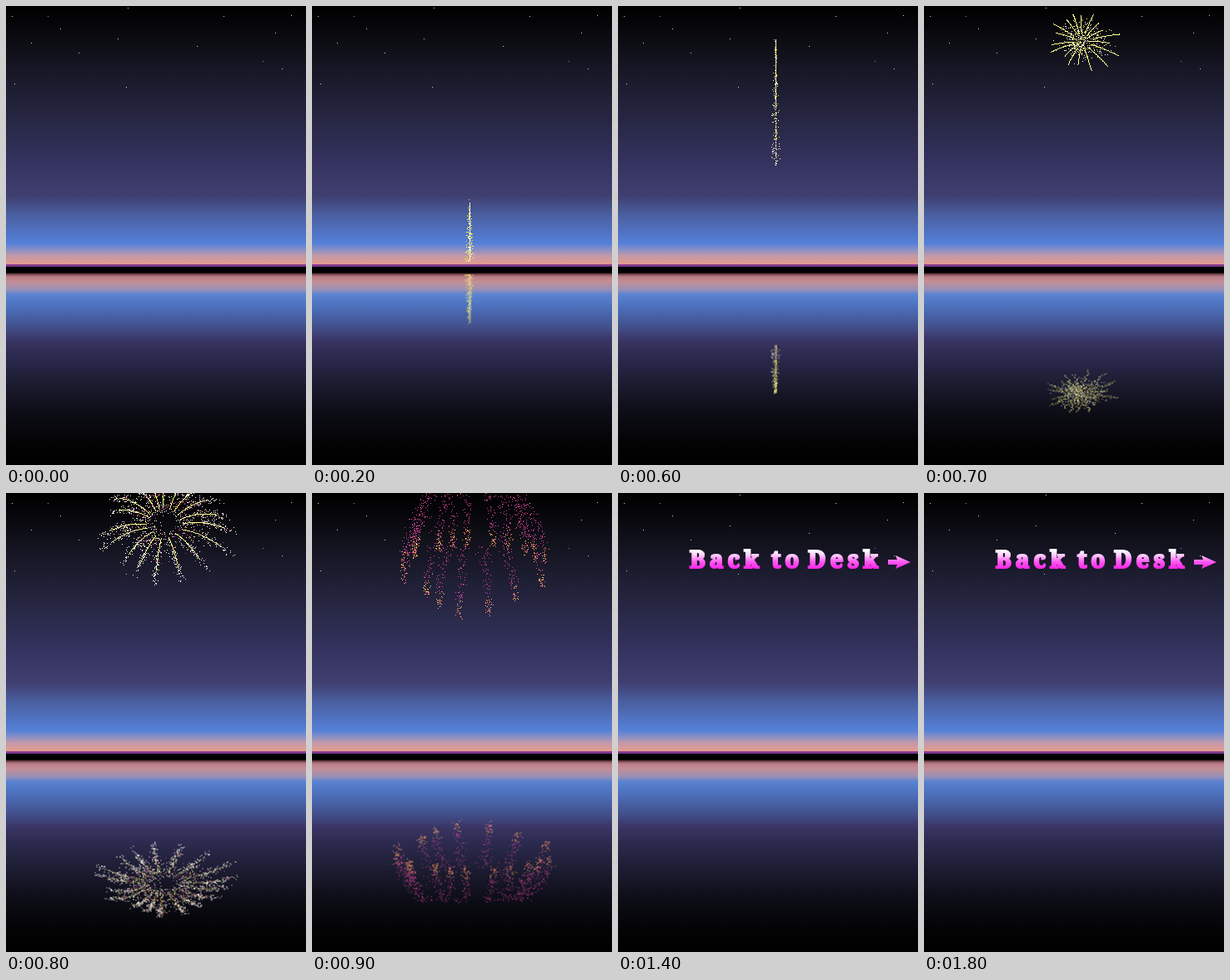
These frames come from a looping animation (360 by 551 pixels, 2.3 s). An HTML page with a canvas:

```html
<!DOCTYPE html>
<html lang="en">
<head>
<meta charset="utf-8">
<title>Fireworks over water</title>
<style>
  html, body { margin: 0; width: 100%; height: 100%; overflow: hidden; background: #000; }
  canvas, svg { position: absolute; left: 0; top: 0; width: 360px; height: 551px; }
  text { font: 900 28px "Noto Serif", serif; letter-spacing: 5px; }
</style>
</head>
<body>
<canvas id="stage" width="360" height="551"></canvas>
<svg viewBox="0 0 360 551">
  <defs>
    <linearGradient id="pink" gradientUnits="userSpaceOnUse" x1="0" y1="69" x2="0" y2="91">
      <stop offset="0" stop-color="#fff"/>
      <stop offset=".3" stop-color="#ffc0fa"/>
      <stop offset=".6" stop-color="#ff5cf2"/>
      <stop offset="1" stop-color="#f822e6"/>
    </linearGradient>
  </defs>
  <g id="sign" fill="url(#pink)" visibility="hidden">
    <text y="89.5" stroke="url(#pink)" stroke-width="2.2"><tspan x="86">Back</tspan><tspan x="184">to</tspan><tspan x="228">Desk</tspan></text>
    <path id="arrow" d="M324 80H335L333 75L351 83L333 91L335 86H324Z"/>
  </g>
</svg>
<script>
const LOOP = 2300, STEP = 100;
const ctx = document.getElementById('stage').getContext('2d');
const sign = document.getElementById('sign');
const arrow = document.getElementById('arrow');

const SKY = [
  [0, '#000'], [30, '#08080d'], [60, '#12121d'], [100, '#1d1d31'], [150, '#2a2a4a'],
  [190, '#353360'], [228, '#403f70'], [250, '#4a5e9f'], [285, '#5580d8'], [293, '#8a90c4'],
  [300, '#c499a8'], [310, '#e49b8f'], [310, '#94408f'], [313, '#6a3488'], [313, '#000'],
  [320, '#000'], [322, '#7a4650'], [325, '#b87d86'], [331, '#c48e96'], [340, '#9a90b4'],
  [347, '#5882d2'], [365, '#4a6bb4'], [385, '#42508c'], [402, '#393463'], [420, '#2c2a4f'],
  [450, '#1d1d33'], [480, '#10101c'], [505, '#08080e'], [530, '#030304'], [551, '#000']
];
const STARS = [
  [7, 12], [50, 12, 1], [65, 27], [30, 44], [87, 56], [134, 39], [146, 2], [229, 48],
  [261, 12], [323, 32], [342, 11], [308, 66, 1], [331, 75], [10, 93], [144, 97]
];
// Ray tips, measured from the burst centre at full bloom.
const RAYS = [
  [-11, 65], [21, 62], [49, 46], [79, 29], [83, 3], [72, -15], [61, -35], [43, -48], [26, -62],
  [-3, -68], [-19, -60], [-34, -50], [-60, -38], [-61, -21], [-74, 7], [-72, 23], [-48, 39], [-34, 56]
];
const CX = 189, CY = 43;
const YELLOW = '#ffff8c', GOLD = '#e8d838', WHITE = '#fff', PINK = '#d8489c', ORANGE = '#ff9c48';

const sky = ctx.createLinearGradient(0, 0, 0, 551);
SKY.forEach(([y, c]) => sky.addColorStop(y / 551, c));

let seed = 1;
const rnd = () => (seed = seed * 16807 % 2147483647) / 2147483647;
const spread = r => (rnd() + rnd() - 1) * r;
const pick = list => list[Math.floor(rnd() * list.length)];

function dot(x, y, color, size = 1, alpha = 1) {
  ctx.globalAlpha = alpha;
  ctx.fillStyle = color;
  ctx.fillRect(Math.round(x), Math.round(y), size, size);
  ctx.globalAlpha = 1;
}

function background() {
  ctx.fillStyle = sky;
  ctx.fillRect(0, 0, 360, 551);
  STARS.forEach(([x, y, teal]) => dot(x, y, teal ? '#2cb4b4' : '#d0d0d8'));
}

function rocket(step) {
  const head = 133 - (step - 4) * 49;
  const tail = Math.min(306, head + 157);
  const mirror = y => {
    const d = y - 133;
    return Math.max(322, 437 - 0.43 * d - 0.00148 * d * d);
  };
  const spark = (x, y, color) => {
    dot(x, y, color);
    dot(x - 1, mirror(y), color, 2, 0.2);
  };
  for (let y = head + 5; y < tail; y++) {
    const u = (y - head) / 157;
    if (u < 0.55 || rnd() < 0.75) dot(189, y, y % 9 ? '#f4f0dc' : YELLOW);
  }
  const top = mirror(tail), bottom = mirror(head);
  ctx.globalAlpha = 0.4;
  ctx.fillStyle = '#d8d088';
  ctx.fillRect(188, top, 3, bottom - top);
  ctx.globalAlpha = 1;
  for (let i = 0; i < 150; i++) {
    const u = Math.pow(rnd(), 0.7);
    const x = 188.5 + spread(2 + 5 * u);
    spark(x, head + u * (tail - head), pick([YELLOW, GOLD, GOLD, WHITE]));
  }
}

// Sparks go up to the sky picture and down, squashed and softer, to the water.
function sparkler(squash, widen, shift, glow) {
  return (x, y, color, alpha = glow) => {
    dot(x, y, color);
    const ry = CY + 420 - squash * (y - CY) + spread(1.5);
    const rx = CX + shift + (x - CX) * widen + Math.sin(ry * 0.9) * 1.5;
    dot(rx - 1, ry - 1, color, 2, alpha);
  };
}

function burst(reach, sag, open) {
  const spark = open ? sparkler(0.65, 1.04, -1, 0.24) : sparkler(0.74, 1, -3, 0.2);
  RAYS.forEach(([vx, vy]) => {
    const size = open ? reach : reach * (0.8 + 0.5 * rnd());
    const at = u => [CX + vx * size * u, CY + vy * size * u + sag * (u * u - u)];
    const scatter = (n, from, to, r, colors) => {
      for (let i = 0; i < n; i++) {
        const [x, y] = at(from + rnd() * (to - from));
        spark(x + spread(r), y + spread(r), pick(colors));
      }
    };
    const du = 0.9 / (Math.hypot(vx, vy) * size);
    for (let u = 0.28; u < (open ? 0.88 : 1); u += du) spark(...at(u), YELLOW, 0.13);
    if (open) {
      scatter(48, 0.58, 1.04, 6, [WHITE, WHITE, '#f0e8c8']);
      scatter(36, 0.22, 0.68, 13, [WHITE, WHITE, YELLOW, PINK]);
      scatter(5, 0.5, 0.95, 7, [PINK]);
    } else {
      scatter(20, 0.05, 0.75, 9, [YELLOW, WHITE, WHITE, GOLD]);
    }
  });
}

// The spent rays hang as columns; those thrown upward have lost their speed.
function embers() {
  const spark = sparkler(0.65, 1.08, -1, 0.2);
  RAYS.forEach(([vx, vy]) => {
    const tip = CY + 39 + vy * (vy > 0 ? 1 : 0.28);
    for (let i = 0; i < 90; i++) {
      const s = Math.pow(rnd(), 1.3);
      const x = CX + vx * 1.09 * (1 - 0.35 * s * s) + spread(5 + 6 * s);
      const y = tip - 82 * s + spread(5);
      if (y < 0) continue;
      spark(x, y, s < 0.25 ? pick([ORANGE, ORANGE, '#ffd078', PINK]) : pick([PINK, PINK, '#b83c88']));
    }
  });
}

function draw(time) {
  const step = Math.floor(time % LOOP / STEP);
  seed = 4127 + step * 911;
  background();
  if (step >= 1 && step <= 6) rocket(step);
  if (step === 7) burst(0.5, 6, false);
  if (step === 8) burst(1, 38, true);
  if (step === 9) embers();
  sign.setAttribute('visibility', step >= 10 ? 'visible' : 'hidden');
  const lit = step >= 18 || step < 15 && step % 2 === 0;
  arrow.setAttribute('display', lit ? 'inline' : 'none');
}

const start = performance.now();
function tick() {
  draw(performance.now() - start);
  requestAnimationFrame(tick);
}
tick();
</script>
</body>
</html>
```
